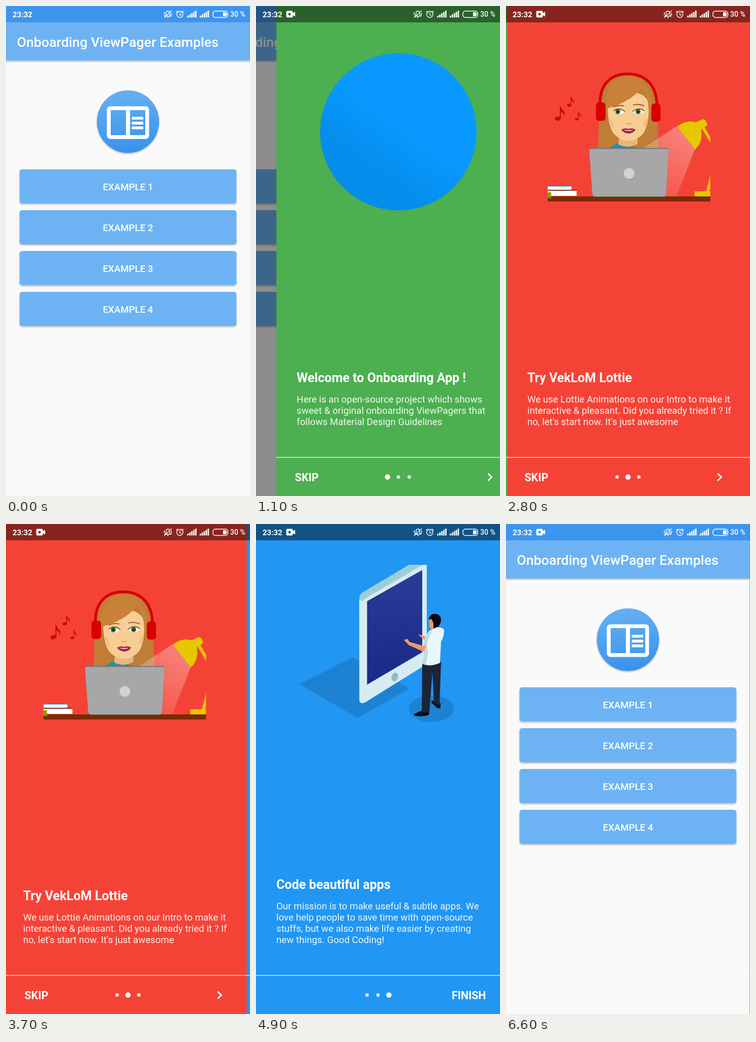
Write an HTML page that moves like this. It is 480 by 960 pixels and loops after 6.7 s.

```html
<!DOCTYPE html>
<html lang="en">
<head>
<meta charset="utf-8">
<title>Onboarding</title>
<style>
html, body { margin: 0; width: 100%; height: 100%; overflow: hidden; background: #fafafa; }
svg { display: block; font-family: Roboto, sans-serif; fill: #fff; }
.none { fill: none; }
.line { fill: none; stroke: #fff; }
.button { font-size: 18.67px; font-weight: 500; text-anchor: middle; }
.head { font-size: 25px; font-weight: 700; }
.body { font-size: 18.67px; fill-opacity: .92; }
.action { font-size: 21.33px; font-weight: 700; }
</style>
</head>
<body>
<svg id="stage" width="480" height="960" viewBox="0 0 480 960">
  <defs>
    <linearGradient id="iconBlue" gradientUnits="userSpaceOnUse" x1="230" y1="165" x2="250" y2="288">
      <stop stop-color="#65b1f3"/><stop offset="1" stop-color="#3991eb"/>
    </linearGradient>
    <linearGradient id="disc" gradientUnits="userSpaceOnUse" x1="245" y1="225" x2="178" y2="320">
      <stop stop-color="#0999ff"/><stop offset="1" stop-color="#058dec"/>
    </linearGradient>
    <linearGradient id="trousers" gradientUnits="userSpaceOnUse" x1="0" y1="325" x2="0" y2="398">
      <stop stop-color="#fff"/><stop offset="1" stop-color="#fff" stop-opacity=".35"/>
    </linearGradient>
    <linearGradient id="beam" gradientUnits="userSpaceOnUse" x1="353" y1="258" x2="290" y2="350">
      <stop stop-color="#fff" stop-opacity=".32"/><stop offset="1" stop-color="#fff" stop-opacity=".12"/>
    </linearGradient>
    <linearGradient id="screen" x1="0" y1="0" x2="0" y2="1">
      <stop stop-color="#283c98"/><stop offset="1" stop-color="#192a86"/>
    </linearGradient>
    <filter id="shadow" x="-10%" y="-20%" width="120%" height="150%">
      <feDropShadow dx="0" dy="2" stdDeviation="1.5" flood-opacity=".28"/>
    </filter>
    <clipPath id="discClip"><circle cx="240" cy="246.5" r="154"/></clipPath>
    <clipPath id="deskClip"><rect x="80" y="80" width="320" height="320"/></clipPath>
    <clipPath id="phoneClip"><rect x="80" y="80" width="320" height="320"/></clipPath>
    <clipPath id="tapClip"><rect x="26.7" y="320" width="426.6" height="66.7" rx="5"/></clipPath>
  </defs>

  <g id="home">
    <path fill="#fafafa" d="M0 0H480V960H0z"/>
    <path fill="#6db3f3" filter="url(#shadow)" d="M0 0H480V106.7H0z"/>
    <path fill="#3e95ee" d="M0 0H480V32H0z"/>
    <text x="21.5" y="80" font-size="26.67" font-weight="500">Onboarding ViewPager Examples</text>
    <circle cx="240" cy="226.5" r="61.3" fill="url(#iconBlue)" filter="url(#shadow)"/>
    <rect x="198.5" y="196.5" width="83" height="64" rx="7"/>
    <path fill="url(#iconBlue)" d="M206 204h30v49h-30zM244 204h30v49h-30z"/>
    <path d="M247.500 217h22.500v5.500h-22.500zM247.500 226.700h22.500v5.500h-22.500zM247.500 236h22.500v5.500h-22.500z"/>
    <g id="buttons"></g>
    <circle id="tap" cx="240" cy="353" clip-path="url(#tapClip)"/>
  </g>
  <path id="dim" fill="#000" d="M0 0H480V960H0z"/>

  <svg id="intro" width="480" height="960">
    <g id="pages">
      <g id="page0">
        <path fill="#4caf50" d="M0 0H481V960H0z"/>
        <circle cx="240" cy="246.500" r="154" fill="url(#disc)"/>
        <g clip-path="url(#discClip)">
          <g id="rings" class="line" stroke-width="1.300">
            <ellipse cx="190" cy="408" rx="192" ry="96" opacity=".35"/>
            <ellipse cx="190" cy="408" rx="113" ry="57" opacity=".75"/>
            <ellipse cx="190" cy="408" rx="35" ry="20"/>
          </g>
          <g id="walker">
            <path fill="url(#trousers)" d="M143 298H198L196 400H181L178 322Q162 336 163 400H144z"/>
            <path fill="#f0a180" d="M160 196H178V222H162z"/>
            <path fill="#f0a180" d="M164 178H191L192 202Q191 212 183 213Q172 213 166 204z"/>
            <path fill="#434343" d="M150 182Q150 167 160 163Q176 157 194 163Q196 171 194 180Q182 183 170 178Q168 183 168 190Q163 187 163 194L166 203Q160 212 157 209Q149 199 150 182z"/>
            <path fill="#f0a180" d="M199 258Q207 271 230 275L240 271L247 275L242 283L231 285Q207 282 198 276z"/>
            <path fill="#333" d="M230 276L247 268L246 277L232 287z"/>
            <path d="M160 217Q170 222 180 215Q196 220 201 232L205 260L198 264L199 305Q198 316 170 317Q145 315 141 308L145 250Z"/>
            <path fill="#d8dcde" d="M192 224Q203 230 205 260L198 264z" opacity=".6"/>
            <path fill="#f0a180" d="M129 265Q128 276 135 283L151 301Q157 310 169 307L166 302L172 300L168 295Q156 296 143 275z"/>
            <path fill="#dadcdd" d="M153 225Q138 230 133 245L127 269Q137 276 146 272Q152 256 157 240Q159 229 153 225z"/>
          </g>
          <g id="pin0">
            <g class="line" stroke-width="1.200">
              <ellipse cx="258.500" cy="166.500" rx="9" ry="4.500"/>
              <ellipse cx="258.500" cy="166.500" rx="18" ry="9" opacity=".6"/>
              <ellipse cx="258.500" cy="166.500" rx="32" ry="16.500" opacity=".3"/>
            </g>
            <path d="M258.500 167L246 152.500A16.500 16.500 0 1 1 271 152.500z"/>
            <g fill="none" stroke="#1786dd" stroke-width="1.500">
              <ellipse cx="254.500" cy="136.500" rx="2.700" ry="3.500"/>
              <path d="M254.500 140v3M253.500 144h2v9h-2zM260.500 133v5q2 3 4 0v-5M262.500 133v10M261.500 144h2v9h-2z"/>
            </g>
          </g>
          <g id="pin1">
            <g class="line" stroke-width="1.300">
              <ellipse cx="322.500" cy="253" rx="13" ry="6.500"/>
              <ellipse cx="322.500" cy="253" rx="26" ry="12.500" opacity=".65"/>
              <ellipse cx="322.500" cy="253" rx="41" ry="21" opacity=".3"/>
            </g>
            <path d="M322.500 253L304.500 232A23 23 0 1 1 340.500 232z"/>
            <g fill="#fff" stroke="#1479c5" stroke-width="1.800">
              <path d="M311 211h15.500v17.500h-15.500zM315 214v-5q3.800-6 7.500 0v5M323 217h12v12h-12zM326 219v-4q3-4 6 0v4"/>
            </g>
          </g>
        </g>
        <g data-title="Welcome to Onboarding App !" data-body="Here is an open-source project which shows|sweet &amp; original onboarding ViewPagers that|follows Material Design Guidelines"></g>
      </g>

      <g transform="translate(480)">
        <path fill="#f44336" d="M0 0H481V960H0z"/>
        <g clip-path="url(#deskClip)"><g transform="translate(-2)">
          <g id="notes" fill="#cf0808">
            <g id="note">
              <ellipse cx="102" cy="220.500" rx="6" ry="4.200" transform="rotate(-12 102 220)"/>
              <path d="M106 197h2.200q1 6 6 9q3 5 0 10q0-6-6-9v14h-2.200z"/>
            </g>
            <use href="#note" transform="translate(53 40) scale(.7)"/>
            <use href="#note" transform="translate(76 85) scale(.62)"/>
          </g>
          <path fill="#1793b0" d="M196 280Q202 269 222 269H262Q280 269 286 280z"/>
          <g id="girl">
            <path fill="#bf7d37" d="M181 280L184 190Q190 137 240 135Q293 137 298 190L300 280H264L220 268L200 280z"/>
            <path fill="#e9b77e" d="M223 255H259V270Q241 281 221 271z"/>
            <path fill="#f8cd94" d="M200 192Q212 172 241 167Q276 170 281 192Q282 232 270 250Q257 264 241 264Q224 264 212 250Q200 235 200 192z"/>
            <path fill="#c98037" d="M196 204Q193 143 240 137Q285 139 288 204L281 214Q281 175 268 160Q244 188 201 200z"/>
            <path fill="#efbd89" d="M204 221q8 3 8 18q-7-2-8-18zM279 219q-8 3-9 18q8-1 9-18z"/>
            <path class="none" stroke="#a16428" stroke-width="2" d="M211 198Q221 193 232 196M250 194Q262 191 272 196"/>
            <path d="M211 207Q222 198 234 207Q223 217 211 207zM249 207Q260 198 272 207Q261 217 249 207z"/>
            <g fill="#32743e"><circle cx="220" cy="207" r="5"/><circle cx="260" cy="207" r="5"/></g>
            <g fill="#172519"><circle cx="220" cy="207" r="2.300"/><circle cx="260" cy="207" r="2.300"/></g>
            <path class="none" stroke="#593718" stroke-width="1.500" d="M211 206Q222 197 234 207M249 207Q260 197 272 205"/>
            <path class="none" stroke="#e2a36c" stroke-width="2" d="M236 229Q242 233 247 229"/>
            <path fill="#a72646" d="M227 242Q235 238 241 241Q247 238 255 242Q250 250 241 250Q231 249 227 242z"/>
            <path d="M231 242.500Q241 244 251 242.500Q241 247 231 242.500z"/>
            <path class="none" stroke="#d90000" stroke-width="5.500" d="M185 194C184 151 208 133 240 133S297 153 297 196"/>
            <g fill="#d90000"><rect x="177" y="189" width="19" height="36" rx="6"/><rect x="286" y="191" width="18" height="36" rx="6"/></g>
          </g>
          <path fill="url(#beam)" d="M337 235L271 278L300 373H335L372 280z"/>
          <path fill="#7b2a04" d="M82 373H402V383H82z"/>
          <path d="M82 352H129V360H82zM82 362H139V372H82z"/>
          <path fill="#2b83a0" d="M82 352H129V353.500H82z"/>
          <path fill="#56301e" d="M82 360H139V361.500H82z"/>
          <path fill="#8f9e0c" d="M82 365h7v13l-3-3-4 2z"/>
          <path class="none" stroke="#e6c800" stroke-width="6" d="M385 234L405 267M408 320L396 367"/>
          <path fill="#e6c800" d="M337 236Q355 222 374 228L386 222Q392 221 394 227Q398 232 394 235L384 242Q388 267 372 281zM371 363H402V373H371z"/>
          <path fill="#777" d="M167 278H317Q321 278 320 284L315 369Q315 374 310 374H175Q170 374 170 369L164 284Q163 278 167 278z"/>
          <path fill="#a7a7a7" d="M167 280H317Q320 280 320 284L315 368Q315 373 310 373H175Q171 373 170 368L164 284Q164 280 167 280z"/>
          <circle cx="242.300" cy="328" r="10.500" fill="#d2d2d2"/>
        </g></g>
        <g data-title="Try VekLoM Lottie" data-body="We use Lottie Animations on our Intro to make it|interactive &amp; pleasant. Did you already tried it ? If|no, let's start now. It's just awesome"></g>
      </g>

      <g transform="translate(960)">
        <path fill="#2196f3" d="M0 0H481V960H0z"/>
        <path fill="#1d82d2" d="M85 314L190 261L302 322L200 380z"/>
        <ellipse cx="345" cy="362" rx="44" ry="26" fill="#1d82d2"/>
        <g clip-path="url(#phoneClip)"><g id="phone">
          <path fill="#9dced6" d="M203 150Q203 139 211 135L312 75H336V276L215 351Q203 356 203 346z"/>
          <path fill="#d5ecf2" d="M210 157Q210 150 216 147L328 82V75H336V276L215 351Q206 355 204 348L203 152Q210 149 210 157z"/>
          <path fill="url(#screen)" d="M218.500 153L327 92V253L218.500 316.500z"/>
          <ellipse cx="273" cy="301.500" rx="6.300" ry="8.700" fill="#91b9c7" transform="rotate(18 273 301.500)"/>
          <g id="chat0">
            <g id="bubble">
              <path fill="#b9dce5" d="M228 159Q228 156 231 154L279 128Q283 127 283 131V156L277 150L233 175Q228 177 228 172z"/>
              <path d="M230 160Q230 157 233 156L280 130Q283 128 283 132V154L277 148L234 172Q230 174 230 170z"/>
              <path class="none" stroke="#4a9eb1" stroke-width="1.400" d="M233 160L280 134M233 164L280 138M233 168L273 146"/>
            </g>
            <g id="badge">
              <ellipse cx="295" cy="135" rx="7.700" ry="9.500" fill="#e9339a" transform="rotate(18 295 135)"/>
              <path id="figure" d="M290 139L293 135Q292 130 295 129Q298 129 297 134L301 135Q299 139 290 140z"/>
            </g>
          </g>
          <g id="chat1">
            <path fill="#b9dce5" d="M270 172Q270 169 273 167L319 142Q323 141 323 145V158Q323 161 320 162L281 183L272 195z"/>
            <path d="M272 171Q272 168 275 167L320 142Q323 141 323 145V156Q323 159 320 160L280 181L272 193z"/>
            <path class="none" stroke="#4a9eb1" stroke-width="1.400" d="M275 172L320 147M275 176L320 151M275 180L313 159"/>
            <ellipse cx="256" cy="190" rx="7.700" ry="9.500" fill="#f5c51d" transform="rotate(18 256 190)"/>
            <use href="#figure" x="-39" y="55"/>
          </g>
          <g id="chat2"><use href="#bubble" y="72"/><use href="#badge" y="72"/></g>
        </g></g>
        <path fill="#040b16" d="M311 373Q318 368 327 366L341 367L340 374Q325 379 311 375zM346 346L363 351V360Q357 363 353 357L345 350z"/>
        <path fill="#1b2438" d="M327 270H364L361 355L350 352L347 290L341 369H326z"/>
        <path fill="#f09a65" d="M319 216L329 219L334 222L331 227L324 221zM291 227L298 225L302 231L330 239L338 228L341 240L331 251L300 237z"/>
        <path fill="#f09a65" d="M340 188L349 181L357 197L354 211H345L346 205Q340 206 341 195z"/>
        <path fill="#0b0a10" d="M340 188Q341 175 354 176Q367 179 363 194L358 203L349 205V194L345 186z"/>
        <path fill="#e8f7fb" d="M343 208L356 202Q370 202 370 210Q369 224 364 230L362 272Q342 281 327 274L331 251L335 235L329 233Q335 214 343 208z"/>
        <path fill="#badde7" d="M347 209Q339 222 336 237Q341 253 333 276L327 274L331 251L335 235L329 233Q335 214 347 209z"/>
        <g data-title="Code beautiful apps" data-body="Our mission is to make useful &amp; subtle apps. We|love help people to save time with open-source|stuffs, but we also make life easier by creating|new things. Good Coding!"></g>
      </g>
    </g>
    <path fill="#000" opacity=".45" d="M0 0H480V32H0z"/>
    <path d="M0 883.700H480V885H0z" opacity=".9"/>
    <g id="skip">
      <text class="action" x="36.500" y="930.500">SKIP</text>
      <path class="line" stroke-width="2.800" d="M416.500 916L423.500 923L416.500 930"/>
    </g>
    <text id="finish" class="action" x="385" y="930.500">FINISH</text>
    <g id="dots"></g>
  </svg>

  <g id="status">
    <text x="13" y="21.700" font-size="15" font-weight="700">23:32</text>
    <path id="camera" fill-rule="evenodd" d="M62 9.500H70Q72.500 9.500 72.500 12V14L77 11.500V20.500L72.500 18V20Q72.500 22.500 70 22.500H62Q59.500 22.500 59.500 20V12Q59.500 9.500 62 9.500zM66 13.500a2.500 2.500 0 1 0 .01 0z"/>
    <g class="line" stroke-width="1.400">
      <path d="M313 20q2-2 2-6q0-4 3.500-4t3.500 4q0 4 2 6zM317 22.500h3M311 23L326 9M311.500 12v6M325.500 13v6"/>
      <circle cx="342" cy="16.500" r="6"/>
      <path d="M342 13V17L345 18.500M334.500 12.500L338 9.500M346 9.500L349.500 12.500"/>
      <rect x="407" y="10" width="29.500" height="12.500" rx="5"/>
    </g>
    <path d="M427 12.200h4q3.500 0 3.500 4t-3.500 4h-4z"/>
    <g id="signal"></g>
    <text x="441" y="21.200" font-size="14" font-weight="500">30 %</text>
  </g>
</svg>
<script>
const $ = id => document.getElementById(id);
const set = (id, name, value) => $(id).setAttribute(name, value);
const move = (id, x, y = 0) => set(id, 'transform', `translate(${x} ${y})`);
const show = (id, on) => set(id, 'opacity', +on);

$('buttons').innerHTML = [1, 2, 3, 4].map((n, i) => `
  <rect x="26.700" y="${320 + 80 * i}" width="426.600" height="66.700" rx="5" fill="#6db3f3" filter="url(#shadow)"/>
  <text class="button" x="240" y="${360.7 + 80 * i}">EXAMPLE ${n}</text>`).join('');
$('dots').innerHTML = [0, 1, 2].map(i => `<circle cx="${218.6 + 21.4 * i}" cy="922.700"/>`).join('');
$('signal').innerHTML = [356.5, 381].map(x => [0, 1, 2, 3, 4].map(i =>
  `<rect x="${x + 3.9 * i}" y="${19 - 2.5 * i}" width="2.700" height="${3.5 + 2.5 * i}" rx=".6"/>`).join('')).join('');

// Copy blocks are bottom-aligned on the last baseline.
for (const g of document.querySelectorAll('[data-title]')) {
  const lines = g.dataset.body.split('|');
  const top = 821 - 22 * (lines.length - 1);
  const text = (cls, y, s) => `<text class="${cls}" x="40" y="${y}">${s.replace('&', '&amp;')}</text>`;
  g.innerHTML = text('head', top - 40, g.dataset.title) +
    lines.map((s, i) => text('body', top + 22 * i, s)).join('');
}

const LOOP = 6700;
const part = (t, from, length) => Math.min(1, Math.max(0, (t - from) / length));
const slide = (t, from) => 1 - (1 - part(t, from, 700)) ** 5;
const swipe = (t, from) => 1 - (1 - part(t, from, 600) ** 2) ** 5;
const rise = (t, from, length) => 1 - (1 - part(t, from, length)) ** 3;

function draw(t) {
  const open = slide(t, 827) - slide(t, 6080);
  move('home', -120 * open);
  show('dim', 0);
  set('dim', 'opacity', .48 * open);
  set('intro', 'x', 480 * (1 - open));
  show('camera', t >= 200);

  const tap = part(t, 620, 280);
  set('tap', 'r', 225 * tap);
  set('tap', 'opacity', .25 * (1 - part(t, 800, 250)));

  const scroll = swipe(t, 2310) + swipe(t, 3670);
  const page = Math.round(scroll);
  move('pages', -480 * scroll);
  show('skip', page < 2);
  show('finish', page === 2);
  [...$('dots').children].forEach((dot, i) => {
    dot.setAttribute('r', i === page ? 5.2 : 3.5);
    dot.setAttribute('opacity', i === page ? 1 : .8);
  });

  const enter = rise(t, 1150, 400);
  move('walker', 0, 30 * (1 - enter));
  show('walker', enter);
  show('rings', rise(t, 1200, 450));
  [[258.5, 167, 1350], [322.5, 253, 1550]].forEach(([x, y, from], i) =>
    set('pin' + i, 'transform', `translate(${x} ${y}) scale(${rise(t, from, 400)}) translate(${-x} ${-y})`));

  const beat = Math.sin((t - 2800) / 250);
  set('girl', 'transform', `rotate(${beat} 240 276)`);
  move('notes', beat, -3 * beat);

  move('phone', 0, -1.5 - 1.5 * Math.cos((t - 4100) * Math.PI / 1800));
  [4900, 5300, 5780].forEach((from, i) =>
    set('chat' + i, 'opacity', 1 - part(t, 4600, 200) + part(t, from, 260)));
}

const begin = performance.now();
function tick() {
  draw((performance.now() - begin) % LOOP);
  requestAnimationFrame(tick);
}
tick();
</script>
</body>
</html>
```
